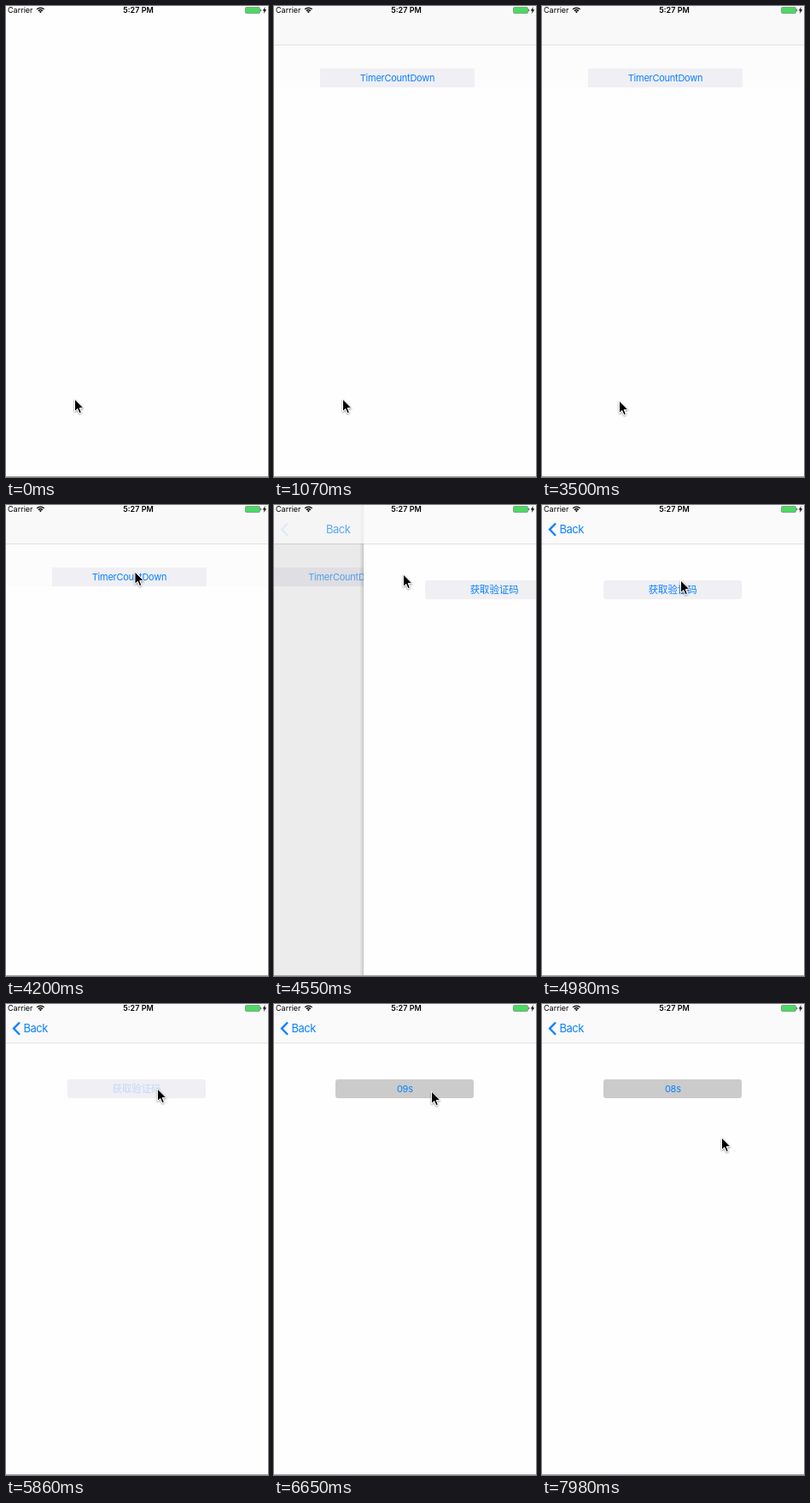
Animation, 307 px wide and 550 px high, one loop 8 s. Source, as an HTML page:

```html
<!DOCTYPE html>
<html lang="en">
<head>
<meta charset="utf-8">
<title>Countdown button</title>
<style>
  html, body { margin: 0; height: 100%; overflow: hidden; background: #fefefe; }
  svg { display: block; width: 100vw; height: 100vh; }
  text { font: 11px Inter, "Noto Sans CJK SC", "Noto Sans CJK", sans-serif; letter-spacing: -.25px; }
  .blue { fill: #0a80ff; }
  .mid { text-anchor: middle; }
  #code { font: 11.4px "Noto Sans CJK SC", "Noto Sans CJK", sans-serif; letter-spacing: 0; }
  #back { font-size: 13px; letter-spacing: -.5px; }
  .status text { font-size: 9px; letter-spacing: 0; }
  .status .time { font-weight: 600; }
</style>
</head>
<body>
<svg viewBox="0 0 307 550">
  <defs>
    <linearGradient id="edge">
      <stop offset="0" stop-opacity="0"/>
      <stop offset="1" stop-opacity=".16"/>
    </linearGradient>
    <filter id="soft" x="-50%" y="-50%" width="200%" height="200%">
      <feDropShadow dx="0" dy="1" stdDeviation=".9" flood-opacity=".45"/>
    </filter>
  </defs>
  <rect width="307" height="550" fill="#fefefe"/>

  <g id="home">
    <rect width="307" height="95" fill="#fcfcfc"/>
    <rect x="54" y="73" width="181" height="22" fill="#efeff4"/>
    <text id="link" class="blue mid" x="144.5" y="88">TimerCountDown</text>
  </g>
  <rect id="dim" width="307" height="549"/>

  <g id="page">
    <rect x="-5" width="5" height="549" fill="url(#edge)"/>
    <rect width="307" height="549" fill="#fefefe"/>
    <rect id="button" x="72" y="88" width="162" height="22" rx="3"/>
    <text id="code" class="blue mid" x="153" y="103">获取验证码</text>
    <text id="count" class="blue mid" x="153.3" y="103"></text>
  </g>

  <g id="bar">
    <rect width="307" height="45" fill="#f9f9f9" opacity=".75"/>
    <rect y="45" width="307" height="1" fill="#000" opacity=".11"/>
    <path id="chevron" d="M16 21.5L9 28.6L16 35.7" fill="none" stroke="#0a80ff" stroke-width="2.3"/>
    <text id="back" class="blue" y="33">Back</text>
  </g>

  <g class="status">
    <text x="2" y="8">Carrier</text>
    <text class="time mid" x="155" y="8">5:27 PM</text>
    <g fill="none" stroke="#000" stroke-width="1.3">
      <path d="M36.1 3.9A6.2 6.2 0 0 1 44.7 3.9M37.9 5.7A3.6 3.6 0 0 1 42.9 5.7"/>
    </g>
    <path d="M38.9 6.8A2 2 0 0 1 41.9 6.8L40.4 8.3Z"/>
    <rect x="280.5" y="1.5" width="17" height="7" rx="1.3" fill="#4cd964" stroke="#6f8a74" stroke-width=".7"/>
    <rect x="298.2" y="3.8" width="1" height="2.4" fill="#555"/>
    <path d="M303.8 1L300.8 5.4H302.7L301.8 9L305.2 4.3H303.2Z"/>
  </g>
  <rect y="549" width="307" height="1" fill="#a6a6a6"/>

  <path id="cursor" filter="url(#soft)" stroke="#fff" stroke-width="1" stroke-linejoin="round"
    d="M0 0V14.4L3.3 11.4L5.5 16.6L7.9 15.6L5.7 10.5L10.2 10.2Z"/>
</svg>
<script>
const $ = id => document.getElementById(id);
const clamp = v => Math.max(0, Math.min(1, v));
const show = (id, alpha) => $(id).setAttribute('opacity', alpha);
const move = (id, x, y = 0) => $(id).setAttribute('transform', `translate(${x} ${y})`);

const LOOP = 8000, WIDTH = 307, TICK = 87.6;
const PRESS = 4280, PUSH = 4428, TAP = 5860, START = 6040;

// time, x, y of the pointer tip
const path = [
  [3490, 80.5, 459], [3500, 90.5, 461], [3588, 99, 440], [3675, 112, 385],
  [3850, 135, 220], [4026, 148, 102], [4113, 150, 67], [4201, 151, 78],
  [4280, 151.5, 81], [4551, 151.5, 81], [4989, 162.5, 88], [5240, 177.5, 99],
  [6649, 177.5, 99], [6650, 184.5, 102], [7889, 184.5, 102],
  [7890, 196, 127], [7979, 196, 127], [7980, 210.5, 156]
];

function pointer(t) {
  const i = path.findIndex(k => k[0] > t);
  if (i === 0) return path[0].slice(1);
  if (i < 0) return path[path.length - 1].slice(1);
  const a = path[i - 1], b = path[i], u = (t - a[0]) / (b[0] - a[0]);
  return [1, 2].map(n => a[n] + (b[n] - a[n]) * u);
}

// a fade made of n equal steps, the first one at the start time
const fade = (t, start, n) => clamp(Math.floor((t - start) / 85 + 1) / n);

// critically damped spring from 0 to 1
function spring(t) {
  const x = Math.max(0, t) / 1000 * 18.26;
  return 1 - (1 + x) * Math.exp(-x);
}

function draw(t) {
  // the screen moves in coarse ticks while dragging and pushing
  const ticking = t >= 3490 && t < 5250;
  const s = ticking ? 3500 + Math.floor((t - 3490) / TICK) * TICK : t;
  const p = spring(s - PUSH);
  const intro = fade(t, 810, 4);

  show('home', intro);
  show('bar', intro);
  move('home', -0.3 * WIDTH * p);
  show('link', t < PRESS ? 1 : clamp(0.2 + Math.max(0, s - PUSH) / 275));
  show('dim', 0.11 * p);
  move('page', WIDTH * (1 - p));
  show('page', p > 0 ? 1 : 0);

  show('back', p);
  move('back', 20.5 + 118 * (1 - p));
  show('chevron', clamp((p - 0.62) / 0.38));

  $('button').setAttribute('fill', t < START ? '#efeff4' : '#cbcbcb');
  show('code', t < TAP ? 1 : t < START ? 0.2 : 0);
  const second = t >= 7360;
  $('count').textContent = second ? '08s' : '09s';
  show('count', second ? fade(t, 7360, 3) : fade(t, 6300, 3) - fade(t, 7100, 2));

  move('cursor', ...pointer(s));
}

const begin = performance.now();
function frame() {
  draw((performance.now() - begin) % LOOP);
  requestAnimationFrame(frame);
}
frame();
</script>
</body>
</html>
```
